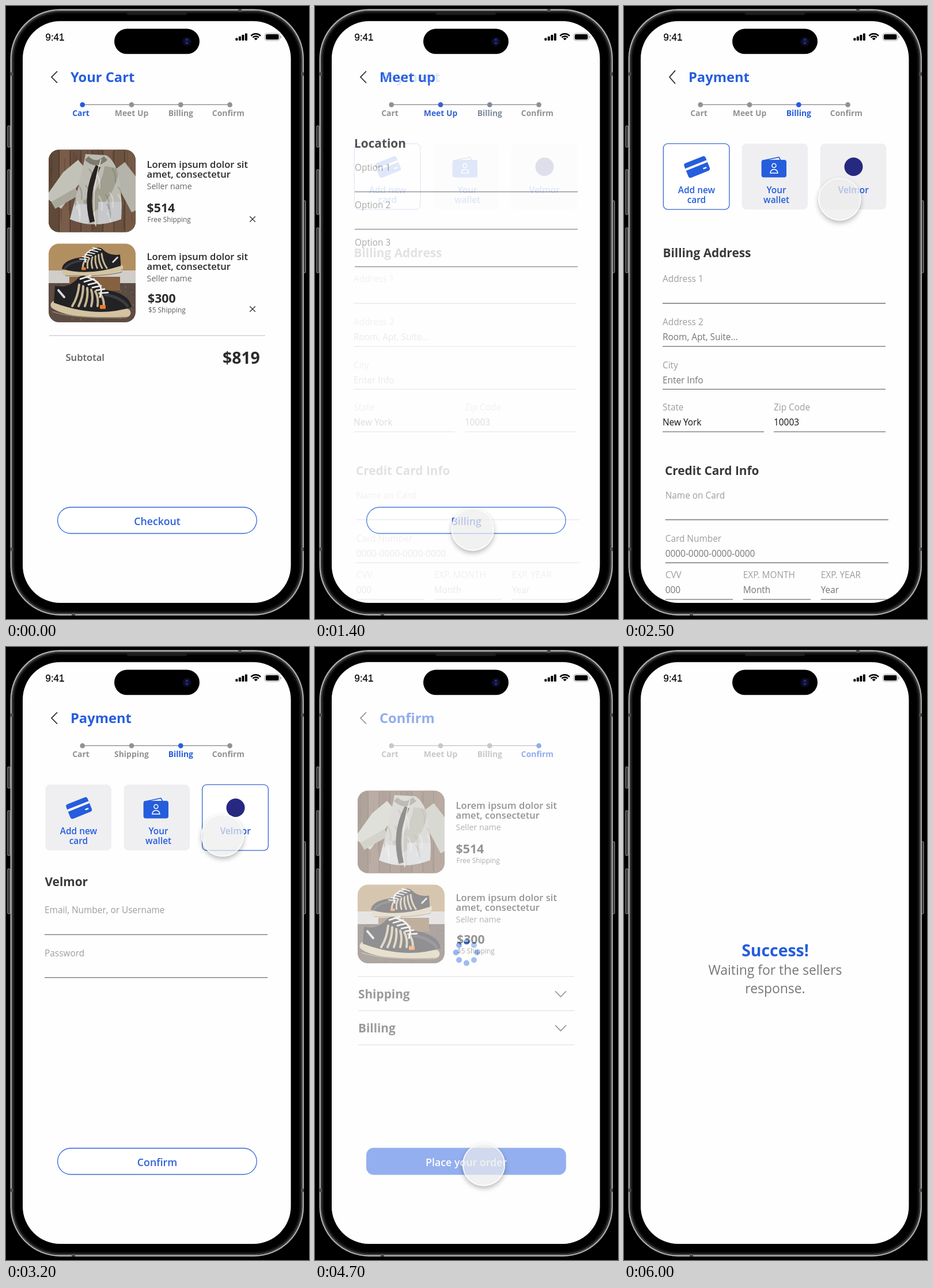
Recreate the animation shown at these times as an HTML page with a canvas. Size 526 by 1064 pixels, loop 6400 ms.

```html
<!DOCTYPE html>
<html lang="en">
<head>
<meta charset="utf-8">
<title>Checkout flow</title>
<style>
  html, body { margin: 0; width: 100%; height: 100%; overflow: hidden; background: #000; }
  canvas { display: block; width: 526px; height: 1064px; }
</style>
</head>
<body>
<canvas id="stage" width="526" height="1064"></canvas>
<script>
const W = 526, H = 1064, LOOP = 6400, TAU = Math.PI * 2;
const BLUE = '#255ddd', INK = '#2b2b2d', HEAD = '#39393b', GRAY = '#929196', HINT = '#9d9d9f';
const FONT = '"Open Sans", "Noto Sans", sans-serif';
const PAYER = 'Velmor';

const main = document.getElementById('stage').getContext('2d');
const spare = document.createElement('canvas');
spare.width = W;
spare.height = H;
const layer = spare.getContext('2d');
let c = main;

// ---- drawing helpers ----
function text(str, x, y, size, weight, color, align = 'left') {
  c.font = `${weight} ${size}px ${FONT}`;
  c.textAlign = align;
  c.fillStyle = color;
  c.fillText(str, x, y);
}

const heading = (str, x, y) => text(str, x, y, 20.8, 700, HEAD);

function rect(x, y, w, h, color) {
  c.fillStyle = color;
  c.fillRect(x, y, w, h);
}

function box(x, y, w, h, r, fill, stroke, lw = 1.3) {
  c.beginPath();
  c.roundRect(x, y, w, h, r);
  if (fill) { c.fillStyle = fill; c.fill(); }
  if (stroke) { c.strokeStyle = stroke; c.lineWidth = lw; c.stroke(); }
}

function disc(x, y, r, fill) {
  c.beginPath();
  c.arc(x, y, r, 0, TAU);
  c.fillStyle = fill;
  c.fill();
}

function arc(x, y, r, from, to, color, lw) {
  c.beginPath();
  c.arc(x, y, r, from, to);
  c.strokeStyle = color;
  c.lineWidth = lw;
  c.stroke();
}

function line(color, lw, ...pts) {
  c.beginPath();
  for (let i = 0; i < pts.length; i += 2) c.lineTo(pts[i], pts[i + 1]);
  c.strokeStyle = color;
  c.lineWidth = lw;
  c.stroke();
}

function bend(color, lw, x0, y0, cx, cy, x1, y1) {
  c.beginPath();
  c.moveTo(x0, y0);
  c.quadraticCurveTo(cx, cy, x1, y1);
  c.strokeStyle = color;
  c.lineWidth = lw;
  c.stroke();
}

function seeded(seed) {
  return () => (seed = seed * 16807 % 2147483647) / 2147483647;
}

// ---- pictures ----
function framed(y, h, paint) {
  c.save();
  c.beginPath();
  c.roundRect(74, y, 151, h, 18);
  c.clip();
  c.lineJoin = 'round';
  paint();
  c.restore();
}

function jacket() {
  const rnd = seeded(77);
  rect(74, 249, 151, 144, '#4a382d');
  for (let x = 74; x < 225; x += 19) {
    rect(x, 249, 17.6, 144, `hsl(24 25% ${30 + rnd() * 8}%)`);
    for (let k = 0; k < 5; k++)
      rect(x + rnd() * 16, 249 + rnd() * 100, 1, 40, 'rgba(45,30,22,.3)');
  }
  line('#c3c2b9', 34, 136, 280, 112, 300, 82, 342);
  line('#a9a89b', 14, 124, 322, 82, 346);
  line('#b5b4aa', 36, 192, 282, 212, 308, 234, 350);

  c.beginPath();
  c.moveTo(138, 257);
  c.lineTo(174, 259);
  c.quadraticCurveTo(204, 276, 200, 370);
  c.quadraticCurveTo(152, 388, 111, 370);
  c.quadraticCurveTo(130, 300, 138, 257);
  c.fillStyle = '#bcbbb2';
  c.fill();
  c.save();
  c.clip();
  bend('#a09f90', 26, 184, 280, 176, 330, 140, 350);
  rect(105, 344, 38, 40, '#cacccf');
  rect(160, 340, 45, 40, '#c6c8cb');
  for (let k = 0; k < 16; k++) {
    const x = 112 + rnd() * 86, y = 280 + rnd() * 80;
    bend(k % 2 ? 'rgba(240,240,236,.4)' : 'rgba(110,110,98,.35)', 2.5, x, y, x + 8, y + 8, x + 6, y + 26);
  }
  c.restore();
  bend('#7d7b6e', 9, 140, 264, 156, 280, 173, 264);
  bend('#272120', 9, 160, 278, 136, 325, 150, 375);
  bend('#dddcd5', 1.6, 165, 266, 146, 325, 156, 382);
}

// a trainer facing right, about 141 wide and 82 high
function shoe(x, y, sx, sy) {
  c.save();
  c.translate(x, y);
  c.scale(sx, sy);
  c.lineCap = 'round';
  bend('#d3c3a1', 15, 8, 54, 40, 74, 132, 68);
  bend('#8d7d61', 2, 4, 66, 40, 79, 132, 76);

  c.beginPath();
  c.moveTo(8, 20);
  c.quadraticCurveTo(32, 26, 50, 4);
  c.quadraticCurveTo(70, -4, 88, 26);
  c.quadraticCurveTo(138, 32, 141, 58);
  c.quadraticCurveTo(80, 78, 6, 50);
  c.closePath();
  c.fillStyle = '#222124';
  c.fill();
  bend('#3d3c40', 5, 96, 36, 122, 40, 134, 56);
  line('#d8d8d8', 4, 14, 28, 24, 40);
  for (let i = 0; i < 6; i++) {
    bend('#c6b693', 4, 50 + i * 7, 18 + i * 3, 48 + i * 9, 40, 38 + i * 11, 56);
    line('#eceae6', 2.8, 52 + i * 7, 8 + i * 5, 70 + i * 6, 2 + i * 6);
  }
  bend('#eceae6', 3, 62, 4, 96, 14, 86, 40);
  box(86, 54, 10, 7, 1, '#ee7a2c');
  c.restore();
}

function shoes() {
  const rnd = seeded(31);
  rect(74, 412, 151, 48, '#b18f60');
  rect(74, 459, 151, 22, '#d0cdca');
  rect(74, 481, 151, 70, '#5d4c44');
  for (let k = 0; k < 120; k++)
    rect(74 + rnd() * 150, 482 + rnd() * 66, 2, 2, `hsl(18 16% ${22 + rnd() * 22}%)`);
  rect(110, 470, 88, 24, '#85613f');
  shoe(204, 418, -0.76, 0.66);
  shoe(77, 466, 1, 0.98);
}

// ---- shared page parts ----
const blank = () => rect(29, 26, 466, 1011, '#fefefe');

function header(title, active, second = 'Meet Up', rise = 10) {
  blank();
  line('#333', 1.8, 89, 123.3 - rise, 79, 123.3, 89, 123.3 + rise);
  text(title, 112, 132, 23.7, 700, BLUE);
  line('#98959d', 1.4, 133, 171.3, 388, 171.3);
  ['Cart', second, 'Billing', 'Confirm'].forEach((name, i) => {
    const color = i === active ? BLUE : GRAY, x = 132.7 + i * 85.3;
    disc(x, 171.4, 4.3, color);
    text(name, x - (i % 3 ? 0 : 2.7), 191, 13.9, 700, color, 'center');
  });
}

function button(label, solid) {
  box(89.6, 870, 345.6, 45.5, solid ? 12 : 22.7, solid ? '#2860e0' : '#fff', '#3268d8');
  text(label, 262.5, 900.5, 17.8, 600, solid ? '#fff' : '#2c61da', 'center');
}

function item(y, price, py, note, x) {
  text('Lorem ipsum dolor sit', 244.6, y, 16.6, 600, INK);
  text('amet, consectetur', 244.6, y + 17, 16.6, 600, INK);
  text('Seller name', 244.6, y + 37, 14.2, 400, '#666');
  text(price, x, py, 21.3, 700, INK);
  text(note, x + 1, py + 17, 11.85, 400, '#5c5c5c');
}

const rule = y => line('#cfd0d8', 1.5, 75, y, 450, y);
const under = (x, y, end) => line('#85848c', 1.6, x, y, end, y);

function items() {
  framed(249.5, 143, jacket);
  framed(412.5, 136.5, shoes);
  item(281, '$514', 358, 'Free Shipping', 244.6);
  item(441, '$300', 514.5, '$5 Shipping', 246);
  rule(572);
}

function field(label, value, x, y, end, color = '#757575') {
  text(label, x, y, 15.4, 400, HINT);
  text(value, x, y + 26, 15.4, 400, color);
  under(x, y + 36.8, end);
}

function cardIcon() {
  c.save();
  c.translate(126.5, 279);
  c.rotate(-0.38);
  box(-20, -13, 40, 27, 4, BLUE);
  rect(-20, -4.5, 40, 4, '#fff');
  rect(9, 6, 6, 2.4, '#fff');
  c.restore();
}

function walletIcon() {
  line(BLUE, 1.6, 242, 268, 269, 262.5, 272, 268);
  box(238.6, 267, 43.4, 30.5, 4, BLUE);
  arc(260.4, 277, 3.5, 0, TAU, '#fff', 1.5);
  arc(260.4, 290, 6.5, Math.PI, TAU, '#fff', 1.5);
  line('#fff', 1.5, 253.2, 290, 267.6, 290);
}

function tiles(active) {
  ['Add new|card', 'Your|wallet', PAYER].forEach((label, i) => {
    const x = 68.3 + i * 136.2, on = i === active;
    box(x, 238.8, 114.6, 114.4, 8, on ? '#fff' : '#efeff1', on && '#3566d4');
    label.split('|').forEach((row, k) =>
      text(row, x + 57.6 + i % 2 * 2.5, 325 + k * 16.6, 15.4, 600, BLUE, 'center'));
  });
  cardIcon();
  walletIcon();
  disc(398.5, 279, 16, '#26297f');
}

// ---- pages ----
function cart() {
  header('Your Cart', 0);
  items();
  for (const y of [370, 526])
    for (const s of [-4.8, 4.8]) line('#333', 1.3, 428 - s, y - 4.8, 428 + s, y + 4.8);
  text('Subtotal', 103.5, 616, 16.6, 600, '#5e5e60');
  text('$819', 376, 621, 28.4, 700, INK);
  button('Checkout');
}

function meet() {
  header('Meet up', 1);
  heading('Location', 68, 245.5);
  for (let i = 0; i < 3; i++) {
    text('Option ' + (i + 1), 69, 286 + i * 65, 15.4, 400, HINT);
    under(69, 322.5 + i * 65, 456);
  }
  button('Billing');
}

function cardForm() {
  header('Payment', 2, 'Meet Up', 11.5);
  tiles(0);
  heading('Billing Address', 67.5, 436.3);
  [['Address 1', ''], ['Address 2', 'Room, Apt, Suite...'], ['City', 'Enter Info']]
    .forEach(([label, hint], i) => field(label, hint, 67, 479.3 + i * 74.6, 454));
  field('State', 'New York', 67, 702.2, 243, '#111');
  field('Zip Code', '10003', 260, 702.2, 454, '#111');
  heading('Credit Card Info', 71, 814.4);
  field('Name on Card', '', 71.7, 854.8, 459);
  field('Card Number', '0000-0000-0000-0000', 71.7, 929.6, 459);
  [['CVV', '000'], ['EXP. MONTH', 'Month'], ['EXP. YEAR', 'Year']]
    .forEach(([label, hint], i) => field(label, hint, 71.7 + i * 135, 993.2, 189 + i * 135));
}

function payerForm() {
  header('Payment', 2, 'Shipping');
  tiles(2);
  heading(PAYER, 67.5, 415);
  field('Email, Number, or Username', '', 67, 462.4, 454);
  field('Password', '', 67, 537, 454);
  button('Confirm');
}

function confirmPage() {
  header('Confirm', 3);
  items();
  ['Shipping', 'Billing'].forEach((name, i) => {
    const y = 610 + i * 59.2;
    heading(name, 75, y);
    line('#333', 1.7, 417, y - 12.6, 426.5, y - 3, 436, y - 12.6);
    rule(y + 21.2);
  });
  button('Place your order', true);
}

function waiting(t) {
  blank();
  const turn = Math.min(t, 5700) / 100;
  for (let i = 0; i < 8; i++) {
    const a = i * TAU / 8;
    c.globalAlpha = 0.72 + (i - turn + 64) % 8 / 25;
    disc(263 + 18.3 * Math.cos(a), 530.3 + 18.3 * Math.sin(a), 5, '#1f62da');
  }
  c.globalAlpha = 1;
}

function success() {
  blank();
  text('Success!', 262.5, 537, 28.4, 700, BLUE, 'center');
  text('Waiting for the sellers', 262.5, 569, 22.9, 400, '#77777a', 'center');
  text('response.', 262.5, 601, 22.9, 400, '#77777a', 'center');
}

// page, dissolve start, dissolve length
const flow = [
  [cart, -1, 1], [meet, 700, 350], [cardForm, 1350, 350], [payerForm, 2600, 400],
  [confirmPage, 3520, 350], [waiting, 4600, 200], [success, 5800, 200]
];

function pages(t) {
  let i = flow.length - 1;
  while (flow[i][1] >= t) i--;
  const [page, start, len] = flow[i];
  const p = Math.min(1, (t - start) / len);
  if (p === 1) return page(t);
  flow[i - 1][0](t);
  c = layer;
  page(t);
  c = main;
  c.globalAlpha = p;
  c.drawImage(spare, 0, 0);
  c.globalAlpha = 1;
}

// ---- touch pointer: rests at each stop between arriving and leaving ----
const stops = [
  { x: 292, y: 1085, from: 0, to: 0 },
  { x: 273.7, y: 908.5, from: 600, to: 1500 },
  { x: 277.5, y: 820.5, from: 1900, to: 1900 },
  { x: 376, y: 327, from: 2550, to: 3250 },
  { x: 246, y: 889.5, from: 3600, to: 3950 },
  { x: 293, y: 898.5, from: 4600, to: 4800 },
  { x: 270, y: 1085, from: 5500, to: LOOP }
];

function pointer(t) {
  const k = stops.findIndex(s => s.to > t), b = stops[k], a = stops[k - 1];
  const u = Math.min(1, (t - a.to) / (b.from - a.to)), e = u * u * (3 - 2 * u);
  const x = a.x + (b.x - a.x) * e, y = a.y + (b.y - a.y) * e, r = 37;

  c.save();
  c.beginPath();
  c.rect(0, 0, W, H);
  c.arc(x, y, r, 0, TAU);
  c.clip('evenodd');
  c.shadowColor = 'rgba(0,0,0,.28)';
  c.shadowBlur = 9;
  c.shadowOffsetY = 4;
  disc(x, y, r, '#fff');
  c.restore();

  disc(x, y, r, 'rgba(236,236,236,.69)');
  arc(x, y, r - 0.8, 0, TAU, 'rgba(255,255,255,.8)', 1.8);
}

// ---- phone ----
function body() {
  rect(0, 0, W, H, '#000');
  for (const [x, y, h] of [[3, 208, 37], [3, 284, 78], [3, 385, 78], [516, 338, 125]])
    box(x, y, 4, h, 1.5, '#2a2a2c', '#98989a', 1.2);
  ['#a9a9ab', '#3b3b3d', '#121213'].forEach((color, i) => {
    const d = i * 2.8;
    box(8.8 + d, 6.6 + d, 507 - d * 2, 1050 - d * 2, 85 - d, '#000', color, 2.6 - i * 0.3);
  });
  for (const y of [115, 940])
    for (const x of [7.5, 512]) rect(x, y, 5, 6, '#4c4c4e');
  rect(403, 5, 6, 5, '#4c4c4e');
  rect(114, 1053, 6, 5, '#4c4c4e');
  box(210, 11, 104, 4.5, 2, '#1d1d1f');
}

function status() {
  c.font = '16.8px "Liberation Sans", Arial, sans-serif';
  c.textAlign = 'left';
  c.fillStyle = c.strokeStyle = '#000';
  c.lineWidth = 0.3;
  c.fillText('9:41', 68.6, 60);
  c.strokeText('9:41', 68.6, 60);

  box(188, 39.5, 148, 43.8, 21.9, '#000');
  disc(314, 61.5, 8, '#0a0b1f');
  disc(314, 61.5, 5, '#10143c');
  for (const y of [58.5, 64.5]) disc(314, y, 1.7, '#29368a');

  for (let i = 0; i < 4; i++) {
    const h = 4.5 + i * 2.7;
    box(398.4 + i * 5.5, 60 - h, 4, h, 1.1, '#000');
  }
  for (const [r, lw] of [[11.4, 2.5], [7.2, 2.5], [2.4, 4]])
    arc(433.7, 59.6, r, -Math.PI * 0.76, -Math.PI * 0.24, '#000', lw);

  box(449.2, 47.4, 26, 12.6, 4, null, '#a3a3a3', 1);
  box(450.9, 49.1, 22.6, 9.2, 2.5, '#000');
  box(476.3, 51.7, 1.5, 4.2, 0.7, '#a3a3a3');
}

function draw(now) {
  const t = Math.floor(now % LOOP / 100) * 100;
  body();
  c.save();
  c.beginPath();
  c.roundRect(29, 26.3, 465.5, 1009.7, 65);
  c.clip();
  pages(t);
  pointer(t);
  status();
  c.restore();
  requestAnimationFrame(draw);
}
requestAnimationFrame(draw);
</script>
</body>
</html>
```
